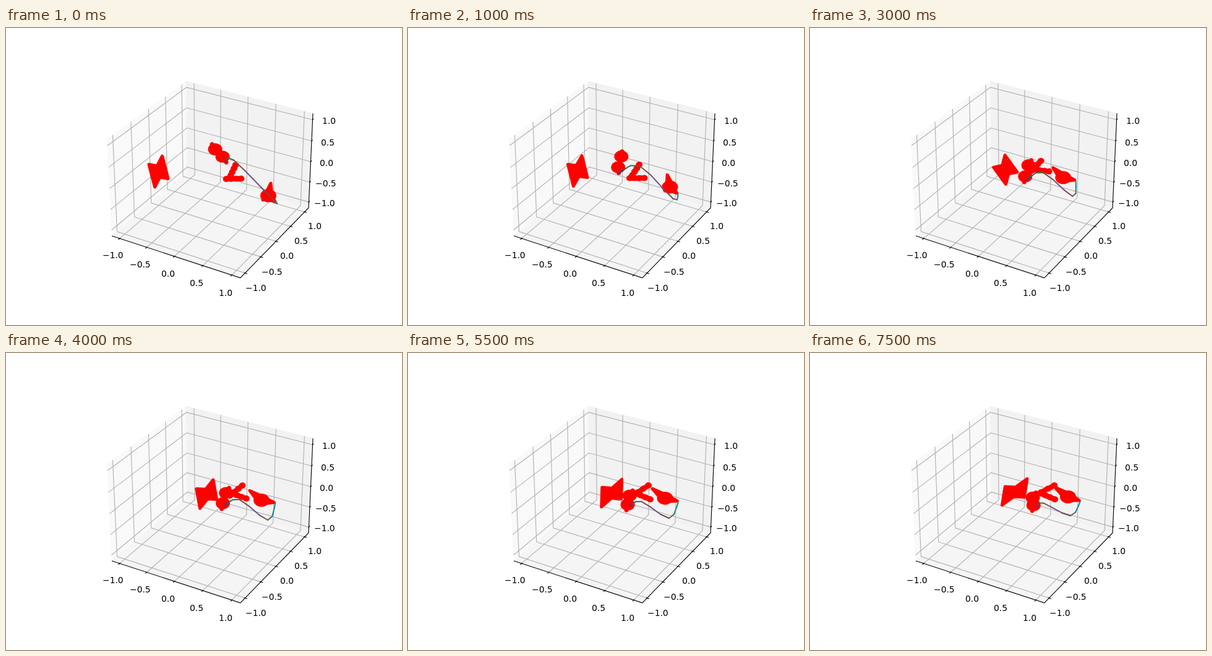
Animation, 640 px wide and 480 px high, one loop 8000 ms. Source, as an HTML page:

```html
<!DOCTYPE html>
<html lang="en">
<head>
<meta charset="utf-8">
<title>3D axes with drifting bodies</title>
<style>
  html, body { margin: 0; width: 100%; height: 100%; overflow: hidden; background: #fff; }
  svg { display: block; width: 640px; height: 480px; }
  text { font: 13.89px "DejaVu Sans", sans-serif; fill: #000; }
  path { fill: none; }
  .grid { stroke: #b0b0b0; stroke-width: 1.11; }
  .axis { stroke: #000; stroke-width: 1.11; }
  #bodies { fill: red; stroke: red; stroke-linejoin: round; stroke-linecap: round; }
  #bodies path { fill: red; }
  #rope path { stroke-width: 2; stroke-linecap: round; }
</style>
</head>
<body>
<svg viewBox="0 0 640 480">
  <g id="axes"></g>
  <g id="bodies"></g>
  <g id="rope"></g>
</svg>
<script>
const LOOP = 8000, STEP = 500;
const LIM = 1.14583;
const ROPE_COLORS = ['#1f4f80', '#2f6070', '#2f7840', '#80504a', '#73508a',
  '#74484f', '#66604a', '#17858c', '#17858c'];

const add = ([x, y], dx, dy) => [x + dx, y + dy];
const mix = (a, b, u) => [a[0] + (b[0] - a[0]) * u, a[1] + (b[1] - a[1]) * u];
const toPath = (pts, close) =>
  'M' + pts.map(p => p.map(v => v.toFixed(2)).join(' ')).join('L') + (close ? 'Z' : '');

// Perspective camera: azimuth -60, elevation 30, distance 10.
function project([x, y, z]) {
  const s = 0.59528 / LIM, X = x * s, Y = y * s, Z = z * s * 0.75;
  const right = 0.866 * X + 0.5 * Y;
  const up = -0.25 * X + 0.433 * Y + 0.866 * Z;
  const near = 0.433 * X - 0.75 * Y + 0.5 * Z;
  const k = 1997.8 / (10 - near);
  return [333 + right * k, 237.4 - up * k];
}

function drawAxes() {
  const L = LIM, outer = L + 0.037, inner = L - 0.018, far = L + 0.19;
  const line = (cls, ...pts) => `<path class="${cls}" d="${toPath(pts.map(project))}"/>`;
  const pane = (color, ...pts) =>
    `<path style="fill:${color};stroke:${color}" d="${toPath(pts.map(project), true)}"/>`;
  const label = (v, p) => {
    const [x, y] = project(p), width = v < 0 ? 33.7 : 22.1;
    const str = v.toFixed(1).replace('-', '\u2212');
    return `<text x="${Math.round(x - width / 2)}" y="${Math.round(y + 10.5)}">${str}</text>`;
  };

  let back = pane('#f9f9f9', [-L, -L, -L], [-L, L, -L], [-L, L, L], [-L, -L, L])
    + pane('#f2f2f2', [-L, L, -L], [L, L, -L], [L, L, L], [-L, L, L])
    + pane('#f5f5f5', [-L, -L, -L], [L, -L, -L], [L, L, -L], [-L, L, -L]);
  let front = line('axis', [-L, -L, -L], [L, -L, -L], [L, L, -L], [L, L, L]);
  for (let v = -1; v <= 1; v += 0.5) {
    back += line('grid', [v, -L, -L], [v, L, -L], [v, L, L])
      + line('grid', [L, v, -L], [-L, v, -L], [-L, v, L])
      + line('grid', [-L, -L, v], [-L, L, v], [L, L, v]);
    front += line('axis', [v, -outer, -L], [v, -inner, -L])
      + line('axis', [outer, v, -L], [inner, v, -L])
      + line('axis', [L, outer, v], [L, inner, v])
      + label(v, [v, -far, -far]) + label(v, [far, v, -far]) + label(v, [far, far, v]);
  }
  document.getElementById('axes').innerHTML = back + front;
}

const shape = (pts, width, close) => `<path stroke-width="${width}" d="${toPath(pts, close)}"/>`;
const ball = ([x, y], rx, ry) =>
  `<ellipse cx="${x.toFixed(2)}" cy="${y.toFixed(2)}" rx="${rx}" ry="${ry}" stroke="none"/>`;

// Two opposite arms around a centre, notched above and below.
function star(c, tall, wide) {
  const top = add(c, ...tall), bottom = add(c, -tall[0], -tall[1]);
  const left = add(c, ...wide), right = add(c, -wide[0], -wide[1]);
  const notch = (a, b) => mix(mix(a, b, 0.5), c, 0.5);
  return shape([left, notch(left, top), top, right, notch(right, bottom), bottom], 5, true)
    + ball(c, 12, 9);
}

function beaded(a, b) {
  return shape([a, b], 8.5) + [0, 0.33, 0.67, 1].map(u => ball(mix(a, b, u), 5.4, 4.9)).join('');
}

function spike(tip, base) {
  const dx = tip[0] - base[0], dy = tip[1] - base[1], k = 6 / (Math.hypot(dx, dy) || 1);
  return shape([tip, add(base, -dy * k, dx * k), add(base, dy * k, -dx * k)], 5, true);
}

// Catmull-Rom curve, three straight pieces per span.
function curve(pts) {
  const out = [pts[0]], at = i => pts[Math.max(0, Math.min(i, pts.length - 1))];
  for (let i = 0; i < pts.length - 1; i++) {
    for (let u = 1 / 3; u < 1.1; u += 1 / 3) {
      out.push([0, 1].map(n => {
        const [a, b, c, d] = [-1, 0, 1, 2].map(k => at(i + k)[n]);
        return b + u * ((c - a) + u * ((2 * a - 5 * b + 4 * c - d) + u * (3 * (b - c) + d - a))) / 2;
      }));
    }
  }
  return out;
}

function render(ms) {
  const t = Math.floor((ms % LOOP) / STEP) * STEP / 1000;
  const decay = (tau, power = 1) => Math.exp(-((t / tau) ** power));
  const fast = decay(1), mild = decay(3);
  const glide = decay(2, 1.33), drop = decay(2.3, 3);
  const sway = fast * Math.cos(1.9 * t);
  const turn = Math.exp(-(((t - 2.7) / 1.05) ** 2));

  const rope = curve([
    [337 + 3.9 * t + 17 * sway, 247.5 - 31 * fast],
    [377 - 9 * fast, 245 - 31.5 * mild],
    [420 + 12 * mild, 278 - 2 * t],
    [437 - 8 * turn, 239 + 43 * glide]
  ]);
  const ropeEnd = rope[rope.length - 1];

  const upper = [362 - 24 * mild, 237 - 41 * mild];
  const lower = [338 + 3.1 * t + 12 * sway, 246.5 - 38.5 * decay(1.7)];
  const chain = [add(upper, 5 - 10 * fast, -8), upper, lower, add(lower, -2 + 8 * fast, 9)];

  const armTop = [371 + 3.2 * t - 8 * turn, 214 + 7.5 * drop];
  const armFoot = [363 - 6 * turn, 230.5 + 8 * drop];
  const baseLeft = [356 + 2.3 * t, 227 + 17 * drop];
  const baseRight = [380 + 2.1 * t, 236.5 + 7 * drop - 6 * turn];

  const head = [411 + 0.8 * t + 13 * drop - 6 * turn, 231 + 40 * decay(2.3)];
  const tips = [
    add(head, -21 + 25 * glide, -15.5 - 4.5 * drop),
    add(ropeEnd, -2, -1),
    add(head, -9 * drop, 7 * drop)
  ];

  document.getElementById('bodies').innerHTML =
    star([331 - 84.5 * glide, 232 - t],
      [6 + 1.9 * t - 13.5 * turn, -25 + 0.5 * t],
      [-15.5 - 4 * turn, -11.5 + 0.4 * t + 7 * turn])
    + shape(chain, 7) + ball(upper, 11.5, 9.8) + ball(lower, 11.5, 9.8)
    + beaded(armTop, armFoot) + beaded(baseLeft, baseRight)
    + tips.map(tip => spike(tip, head)).join('') + ball(head, 13, 10.5);
  document.getElementById('rope').innerHTML = ROPE_COLORS.map((color, i) =>
    `<path stroke="${color}" d="${toPath([rope[i], rope[i + 1]])}"/>`).join('');
}

drawAxes();
const start = performance.now();
function tick() {
  render(performance.now() - start);
  requestAnimationFrame(tick);
}
tick();
</script>
</body>
</html>
```
